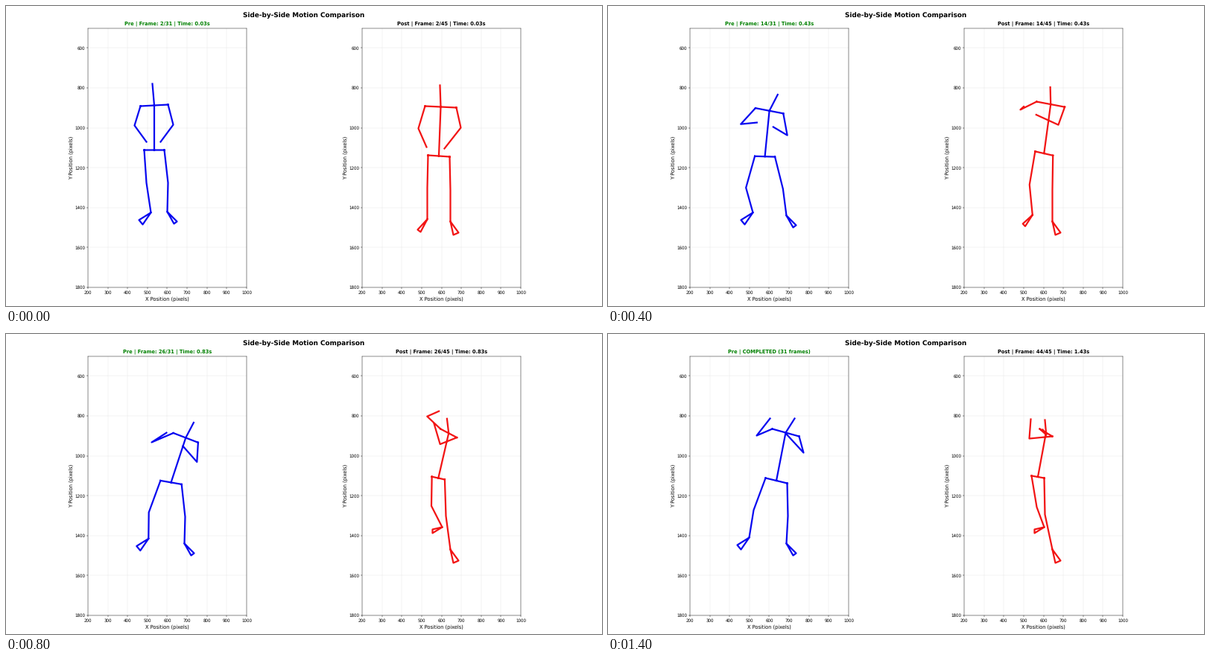
These frames come from a looping animation (800x403 px, 1500 ms). A matplotlib script:

```python
import matplotlib.pyplot as plt
import numpy as np
from matplotlib.animation import FuncAnimation

W, H, DPI = 800, 403, 40
STEPS, INTERVAL = 15, 100
TOP, BOTTOM, PANEL_W = 29.7, 378.0, 213.1

plt.rcParams.update({"font.family": "DejaVu Sans", "text.hinting": "none"})


def glide(start, end, *points):
    """Motion through evenly timed waypoints, at rest before and after."""
    times = np.linspace(start, end, len(points))
    return lambda n: np.array([np.interp(n, times, axis) for axis in zip(*points)])


def still(x, y):
    return glide(0, 0, (x, y))


class Side:
    """One arm and one leg; the foot corners are offsets from the ankle."""

    def __init__(self, arm, leg, foot):
        self.arm, self.leg, self.foot = arm, leg, foot

    def pose(self, n):
        arm = [joint(n) for joint in self.arm]
        leg = [joint(n) for joint in self.leg]
        toes = [leg[-1] + corner(n) for corner in self.foot]
        return arm, leg + toes + [leg[-1]]


class Walker:
    def __init__(self, total, head, left, right):
        self.total, self.head = total, head
        self.left, self.right = left, right

    def outline(self, n):
        """All bones as one path, separated by gaps."""
        arm_l, leg_l = self.left.pose(n)
        arm_r, leg_r = self.right.pose(n)
        neck = (arm_l[0] + arm_r[0]) / 2
        pelvis = (leg_l[0] + leg_r[0]) / 2
        strokes = [[self.head(n), neck, pelvis], [arm_l[0], arm_r[0]],
                   [leg_l[0], leg_r[0]], arm_l, arm_r, leg_l, leg_r]
        gap = [(np.nan, np.nan)]
        return np.vstack([part for s in strokes for part in (s, gap)]).T


pre = Walker(
    31,
    head=glide(2, 31, (196, 104), (205, 112), (239, 122), (252, 121), (250, 113)),
    left=Side(
        arm=[glide(2, 31, (180, 134), (183, 136), (205, 137), (226, 135), (220, 127)),
             glide(11, 31, (172, 160), (191, 154), (199, 136)),
             glide(2, 31, (188, 182), (195, 158), (213, 150), (217, 113))],
        leg=[glide(2, 31, (185, 193), (199, 203), (211, 193)),
             glide(2, 31, (188, 237), (184, 245), (195, 236)),
             glide(17, 31, (194, 277), (189, 273))],
        foot=[still(-16, 10), still(-11, 16)]),
    right=Side(
        arm=[glide(2, 31, (217, 132), (223, 136), (241, 148), (258, 149), (256, 137)),
             glide(2, 31, (224, 159), (237, 170), (250, 183), (262, 159)),
             glide(2, 31, (207, 182), (217, 161), (235, 165), (239, 134))],
        leg=[glide(2, 31, (212, 193), (226, 204), (240, 200)),
             glide(2, 31, (217, 237), (238, 247), (241, 244)),
             glide(2, 11, (216, 276), (239, 281))],
        foot=[still(9, 16), still(13, 13)]))

post = Walker(
    45,
    head=glide(2, 44, (582, 106), (595, 109), (590, 115), (586, 115)),
    left=Side(
        arm=[glide(2, 44, (562, 134), (577, 127), (585, 127), (579, 127)),
             glide(2, 32, (553, 164), (553, 158), (553, 126), (559, 104), (588, 135)),
             glide(2, 32, (564, 189), (557, 167), (558, 113), (580, 97), (583, 128))],
        leg=[glide(2, 44, (566, 200), (574, 194), (570, 190), (568, 190)),
             glide(11, 31, (565, 244), (566, 229), (575, 232)),
             glide(11, 25, (565, 286), (585, 259))],
        foot=[glide(11, 26, (-13, 14), (-13, 3)),
              glide(11, 26, (-9, 17), (-13, 8))]),
    right=Side(
        arm=[glide(2, 44, (604, 136), (614, 135), (601, 140), (596, 137)),
             glide(11, 44, (610, 163), (588, 149), (572, 145), (565, 140)),
             glide(2, 44, (588, 191), (572, 138), (575, 113), (567, 114))],
        leg=[glide(2, 44, (595, 202), (597, 200), (585, 193), (585, 193)),
             glide(17, 32, (596, 247), (586, 242)),
             still(596, 289)],
        foot=[still(4, 18), still(11, 15)]))

fig = plt.figure(figsize=(W / DPI, H / DPI), dpi=DPI, facecolor="white")
fig.suptitle("Side-by-Side Motion Comparison", fontsize=16, fontweight="bold")


def panel(left):
    ax = fig.add_axes([left / W, 1 - BOTTOM / H, PANEL_W / W, (BOTTOM - TOP) / H])
    ax.set(xlim=(200, 1000), ylim=(1800, 500),
           xticks=range(200, 1001, 100), yticks=range(600, 1801, 200))
    ax.set_xlabel("X Position (pixels)", fontsize=12)
    ax.set_ylabel("Y Position (pixels)", fontsize=12, labelpad=2.5)
    ax.grid(True, alpha=0.3)
    return ax


# Overlay whose whole numbers fall on pixel centres.
stage = fig.add_axes([0, 0, 1, 1], zorder=5)
stage.set(xlim=(-0.5, W - 0.5), ylim=(H - 0.5, -0.5))
stage.axis("off")


def bones(color):
    return stage.plot([], [], color=color, lw=4)[0]


VIEWS = [
    ("Pre", pre, panel(109.9), bones("#0808f0"), "green"),
    ("Post", post, panel(478.0), bones("#f21414"), "black"),
]


def update(step):
    n = 2 + 3 * step
    for name, walker, ax, line, color in VIEWS:
        if n > walker.total:
            text = f"{name} | COMPLETED ({walker.total} frames)"
        else:
            text = f"{name} | Frame: {n}/{walker.total} | Time: {(n - 1) / 30:.2f}s"
        ax.set_title(text, fontsize=12, fontweight="bold", color=color)
        line.set_data(*walker.outline(n))
    return [view[3] for view in VIEWS]


anim = FuncAnimation(fig, update, frames=STEPS, interval=INTERVAL,
                     repeat=True, repeat_delay=0, blit=False)
plt.show()
```
